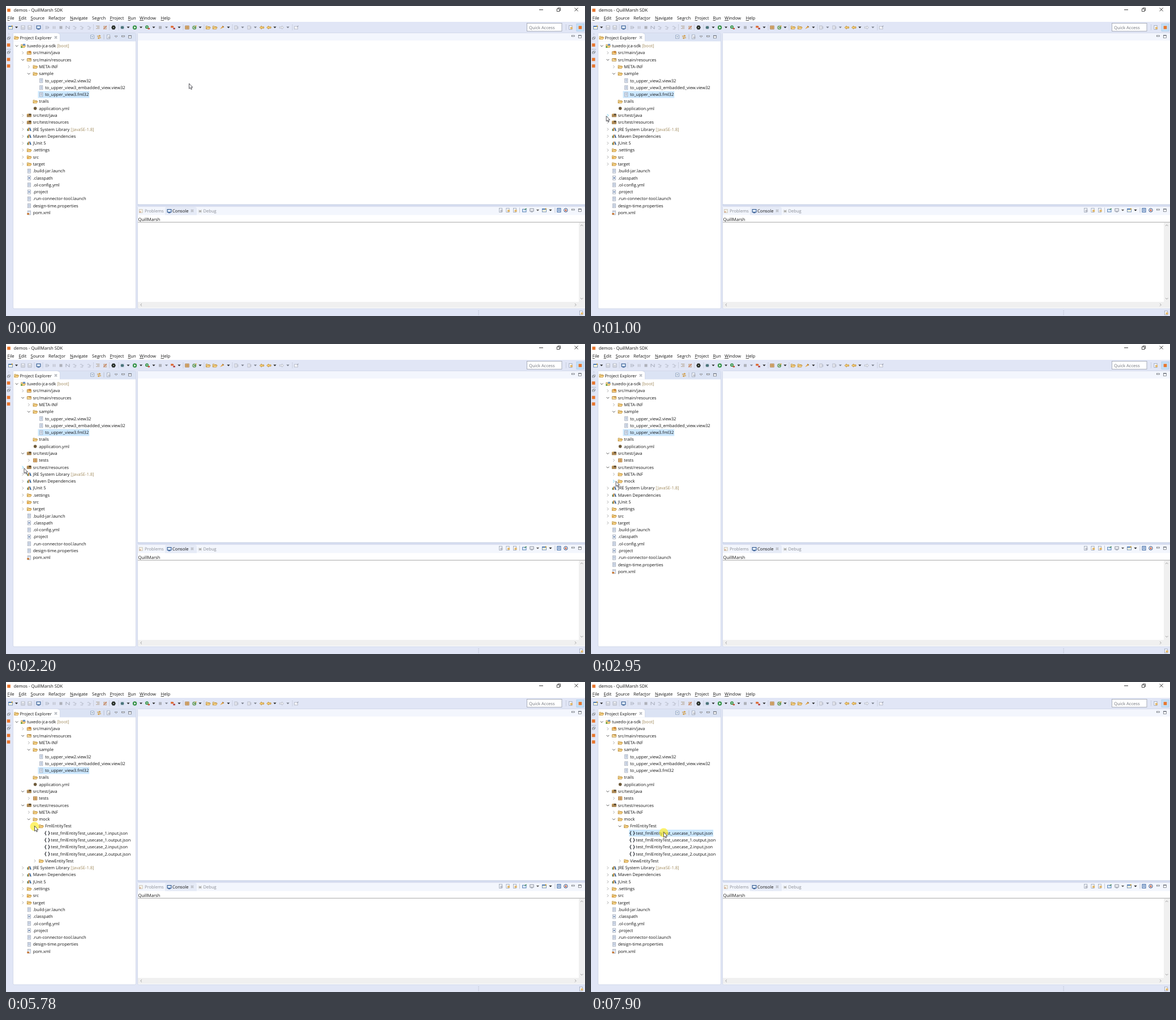
An HTML page for the animation above (8000 ms loop, 1023x548 px).

```html
<!DOCTYPE html>
<html lang="en">
<head>
<meta charset="utf-8">
<title>demos - QuillMarsh SDK</title>
<style>
html, body { margin: 0; width: 100%; height: 100%; overflow: hidden; background: #fff; }
svg { display: block; width: 100%; height: 100%; }
text { font-family: "Open Sans", "Noto Sans", sans-serif; font-size: 7.6px; fill: #151515; white-space: pre; text-rendering: geometricPrecision; }
</style>
</head>
<body>
<svg id="stage" viewBox="0 0 1023 548" preserveAspectRatio="none"></svg>
<script>
const LOOP = 8000;
const stage = document.getElementById('stage');

// Markup helpers
const rect = (x, y, w, h, fill, more = '') => `<rect x="${x}" y="${y}" width="${w}" height="${h}" fill="${fill}" ${more}/>`;
const line = (d, color, w = 1, fill = 'none') => `<path d="${d}" stroke="${color}" stroke-width="${w}" fill="${fill}"/>`;
const dot = (x, y, r, fill, more = '') => `<circle cx="${x}" cy="${y}" r="${r}" fill="${fill}" ${more}/>`;
const shape = (d, fill) => `<path d="${d}" fill="${fill}"/>`;
const label = (x, y, s, more = '') => `<text x="${x}" y="${y}" ${more}>${s}</text>`;
const at = (x, y, s) => `<g transform="translate(${x} ${y})">${s}</g>`;
const drop = (x, y, color = '#222') => shape(`M${x - 2.6} ${y - 1.3}h5.2l-2.6 2.8z`, color);
const dots = (x, y1, y2) => `<path d="M${x} ${y1}V${y2}" stroke="#a9afbf" stroke-width="1" stroke-dasharray="1 1.4"/>`;
const bar = (x, y) => line(`M${x} ${y - 4.5}v9`, '#b4b9c8', .8);
const cross = (x, y, r, color, w = .8) => line(`M${x - r} ${y - r}l${2 * r} ${2 * r}M${x + r} ${y - r}l${-2 * r} ${2 * r}`, color, w);

// Icons are centred on 0,0
const folderShape = line('M-3.6 2.8V-2.4h2.6l.8 1h3v1.2', '#b98a35', .8, '#fbe9b0') + line('M-3.6 2.8L-2 -.4H4.2L2.6 2.8Z', '#b98a35', .8, '#fdd88a');
const page = rect(-2.6, -3.5, 5.2, 7, '#f4f7fc', 'stroke="#8e98ab" stroke-width=".7"');
const packed = c => rect(-3.8, -1.8, 7.4, 4.4, c, 'stroke="#8a6a35" stroke-width=".6"') + rect(-3.4, -3, 3.4, 1.6, '#d7a95c');
const icons = {
  folder: folderShape,
  source: packed('#f7c877') + rect(-.8, -3.2, 4, 3, '#c77c2e'),
  resource: packed('#fbdc98') + rect(-.2, -2.8, 3.6, 2.4, '#b68a45'),
  test: packed('#b38d57') + rect(-.6, -3, 4, 2.8, '#594a35'),
  srcdir: folderShape + dot(-2.4, 1.6, 1.7, '#e5a84c'),
  project: folderShape + rect(-.4, -3.6, 4.2, 3, '#6b94c5') + dot(-2.8, 2, 1.5, '#5da648'),
  library: rect(-3.5, -1, 1.7, 4, '#4d7d58') + rect(-1.7, -2.8, 1.8, 5.8, '#c58437') + shape('M.3 -2.5l1.5 -.5L4 2.8H1.5z', '#3f6796'),
  file: page + line('M-1.5 -1.8h3M-1.5 -.2h3M-1.5 1.4h3', '#7790b7', .7),
  xml: page + cross(0, 0, 1.2, '#33588f', 1),
  pom: page + shape('M-3.8 3.4V.6h4v2.8z', '#c97835') + line('M-1.4 -1.8h2.8', '#7790b7', .7),
  yml: dot(0, 0, 2.8, '#6d5a3a'),
  pack: rect(-3.1, -2.8, 6.2, 5.6, '#f3d5a2', 'stroke="#a76b28" stroke-width=".9"') + line('M0 -2.8v5.6M-3.1 0h6.2', '#a76b28', .9),
  json: line('M-1.7 -3.4q-1.3 0 -1.3 1.4T-4 0q1 .2 1 1.9t1.3 1.5M1.7 -3.4q1.3 0 1.3 1.4T4 0q-1 .2 -1 1.9t-1.3 1.5', '#20242c', 1.1),
  screen: rect(-3.4, -2.9, 6.8, 4.8, '#e7f0fb', 'stroke="#2c568f" stroke-width="1.1"') + line('M-2 3.2h4', '#2c568f', 1),
  grayScreen: rect(-3.2, -2.8, 6.4, 4.6, '#eef0f5', 'stroke="#858b98" stroke-width=".9"') + line('M-2 3h4', '#858b98', .9),
  window: rect(-3.6, -2.6, 7.2, 5.6, '#fff9df', 'stroke="#5b7dad" stroke-width=".8"') + rect(-3.6, -2.8, 7.2, 1.8, '#4d7ab5') + shape('M2 -4l2.4 1.4L2 -.6z', '#d9a52e'),
  floppy: rect(-3.2, -3.2, 6.4, 6.4, '#d3d6df', 'stroke="#aeb3bf" stroke-width=".7"') + rect(-1.6, -3, 3.2, 2, '#f1f2f6'),
  gray: line('M-3 -2h3.4M-3 0h5.6M-3 2h3.4M1 -2.4l2.6 2.4L1 2.4', '#a7acb9', .9),
  pause: line('M-1.5 -2.6v5.2M1.5 -2.6v5.2', '#bcc0cb', 1.6),
  stop: rect(-2.5, -2.5, 5, 5, '#aeb1ba'),
  cut: line('M-3 2.8V-2.6L3 2.6V-2.8', '#999eac', .9),
  step: line('M-3.2 -1.6q3.4 -1.8 4.6 2M-.2 -.4l1.8 1.8l1.4 -2M-2.4 2.8h4.4', '#afb4c1', .9),
  lines: line('M-3 -2.6h6.4M-1 -.4h4.4M-3 1.8h6.4', '#ad9b80', .9),
  tools: line('M-3 -2h6M-3 0h6M-3 2.4h6', '#b98244', .9) + line('M-3 3L3 -3', '#c55339', .9),
  hex: shape('M-3.8 0L-2 -3.5H2L3.8 0L2 3.5H-2z', '#202521') + dot(0, 0, 1.3, '#8b9a8d'),
  bug: dot(0, 0, 2.2, '#62958a', 'stroke="#315a66" stroke-width=".8"') + line('M-3.4 0h6.8M-2.6 -2.8l5.2 5.6M2.6 -2.8l-5.2 5.6', '#3d6572', .7),
  grayBug: dot(0, 0, 1.9, '#bdbdb8') + line('M-3.4 0h6.8M-2.5 -2.8l5 5.6M2.5 -2.8l-5 5.6', '#a5a5a2', .7),
  run: dot(0, 0, 3.7, '#359248') + shape('M-1.1 -2L2.2 0l-3.3 2z', '#fff'),
  cover: dot(-1, -.8, 2.9, '#359248') + shape('M-1.7 -2.2L.8 -.8l-2.5 1.4z', '#fff') + rect(.6, .8, 3.4, 2.4, '#c24f36'),
  external: shape('M-3.8 -3h4l1.6 2l-1.6 1.6h-4z', '#df6e38') + rect(.4, .6, 3.4, 2.6, '#b03838'),
  klass: dot(-.3, .2, 3.4, '#61985b') + line('M1 -1.1a1.7 1.7 0 1 0 0 2.4', '#fff', .9) + rect(1.6, -3.6, 2, 2, '#e2ae48'),
  brush: shape('M-3.8 2.8L.6 -2.8L3.2 -.6z', '#e2a548') + line('M.6 -2.6l2.4 2', '#8e6634', 1.2),
  next: rect(-3, -3, 4.2, 6, '#e5e7ee', 'stroke="#b1b5c0" stroke-width=".8"') + line('M2.8 -2v4.4', '#b1b5c0', 1),
  back: line('M-3.8 0L-.6 -2.8V-1.2H3.6V1.2H-.6V2.8Z', '#b78025', .8, '#fbd77e'),
  forth: line('M3.8 0L.6 -2.8V-1.2H-3.6V1.2H.6V2.8Z', '#b1b5c0', .8, '#eef0f5'),
  pin: rect(-3.4, -2, 6, 4.8, '#f4f5f9', 'stroke="#b1b5c0" stroke-width=".8"') + line('M1 -.6L3.6 -3', '#a0a5b2', 1.1),
  pinOn: rect(-3.4, -1.8, 6.4, 4.8, '#e1edfa', 'stroke="#4776ae" stroke-width=".9"') + line('M.4 -.8L3.6 -3', '#3f8751', 1.4),
  collapse: rect(-2.8, -2.8, 5.6, 5.6, '#fff', 'stroke="#7890b2" stroke-width=".8"') + line('M-1.6 0h3.2', '#37659e', .9),
  link: line('M-3.4 -1.2H2M0 -3l2.4 1.8M3.4 1.6H-2M0 3.4l-2.4 -1.8', '#cf9434', 1.3),
  warn: rect(-3.2, -2.8, 6, 5.6, '#f4f1e8', 'stroke="#bfb8a6" stroke-width=".7"') + rect(-2.8, .4, 2.6, 2, '#d9a68c'),
  docs: page + rect(-.4, -.8, 4, 3.6, '#e2b76a'),
  docsGray: page + rect(-.4, -.8, 4, 3.6, '#b9bcc6'),
  blueDoc: rect(-3, -3.3, 6, 6.6, '#e4eefb', 'stroke="#315f9f" stroke-width="1"') + line('M-1.6 -1.2h3.2M-1.6 .8h3.2', '#315f9f', .9),
  ring: dot(0, 0, 3.2, '#fff', 'stroke="#334f82" stroke-width="1"') + shape('M-1.8 1.6L0 -2.6L1.8 1.6z', '#c65332'),
  brand: rect(-2.8, -2.8, 5.6, 5.6, '#e8762d'),
  restore: rect(-1.2, -2.2, 3.4, 2.6, '#fff', 'stroke="#606774" stroke-width=".7"') + rect(-2.4, -.6, 3.2, 2.6, '#fff', 'stroke="#606774" stroke-width=".7"'),
  mini: rect(-2.6, -2, 5.2, 1.9, '#fff', 'stroke="#5e6470" stroke-width=".7"'),
  maxi: rect(-2.6, -2.3, 5.2, 4.6, '#fff', 'stroke="#5e6470" stroke-width=".7"') + line('M-2.6 -1.7h5.2', '#5e6470', .9)
};
const icon = (name, x, y) => at(x, y, icons[name]);
const iconRow = (y, list) => list.split(' ').map(s => { const [n, x] = s.split(':'); return icon(n, +x, y); }).join('');

function windowFrame() {
  const menus = [['_File', 2.5], ['_Edit', 22.5], ['_Source', 43.5], ['Refac_tor', 75], ['_Navigate', 113], ['Se_arch', 152], ['_Project', 183.5], ['_Run', 215.5], ['_Window', 236], ['_Help', 273.5]];
  const key = s => s.replace(/_(.)/, '<tspan text-decoration="underline">$1</tspan>');
  return rect(0, 0, 1023, 548, '#e1e6f6') + rect(0, 0, 1023, 28, '#fff')
    + icon('brand', 5, 7.5) + label(13.5, 9.8, 'demos - QuillMarsh SDK', 'style="font-size:7.7px"')
    + line('M942 6.7h7', '#222', .9) + line('M973.4 5h4.6v4.6h-4.6zM975 5V3.4h4.6V8H978', '#222', .8) + cross(1007.7, 6.3, 3, '#222', .9)
    + menus.map(([s, x]) => label(x, 24, key(s), 'style="font-size:7.7px"')).join('');
}

function toolbar() {
  return iconRow(38, 'window:8 floppy:30 floppy:42 screen:57.5 gray:72.5 pause:85 stop:97 cut:109 step:121.5 step:134 step:147 lines:162 tools:175 hex:190 bug:205.5 run:227.5 cover:250 stop:272.5 external:295 pack:320 klass:333 folder:357 folder:369 brush:382 next:407 next:430 back:452 back:464.5 forth:487 pin:513')
    + [18.5, 216, 238.5, 261, 306, 343, 393, 475].map(x => drop(x, 37.8)).join('')
    + [283.5, 418, 440.5, 498].map(x => drop(x, 37.8, '#777c88')).join('')
    + [50, 65, 154.5, 182.5, 199, 313, 350, 400, 506, 989.5].map(x => dots(x, 33, 43)).join('')
    + rect(920.5, 30.5, 61.5, 14, '#fff', 'stroke="#9aa0ad" stroke-width=".8"') + label(924, 40.6, 'Quick Access', 'style="fill:#70747c"')
    + icon('docs', 997.5, 38) + rect(1008, 31.5, 13, 13, '#c5dff5', 'stroke="#9cc7ea" stroke-width=".6"') + icon('brand', 1014.5, 38);
}

function panels() {
  const box = (x, y, w, h) => rect(x, y, w, h, '#fff', 'stroke="#ccd3e6" stroke-width=".8" rx="2"');
  const head = (x, y, w, h, color = '#f3f6fd') => rect(x, y, w, h, color);
  const gone = 'style="fill:#8a8e96"';
  const arrow = d => line(d, '#9a9a9a', .9);
  return dots(5, 48, 52) + icon('restore', 5, 57) + icon('brand', 4.5, 69) + line('M1 76.5h8', '#a9afbf', .8) + icon('restore', 5, 82) + icon('brand', 4.5, 94.5) + icon('brand', 4.5, 106)
    + box(12.5, 47.5, 217, 487.5) + head(13, 48, 216, 14.5, '#dbe3f4') + shape('M13 62.5V49q0 -1 1 -1H91q4 0 4.5 4V62.5z', '#fff') + line('M91 47.8q4.5 0 4.5 4.5V62', '#ccd3e6', .8)
    + icon('folder', 18.5, 56) + label(24.5, 58.6, 'Project Explorer') + cross(88, 55.5, 2, '#858a95', 1.3) + cross(88, 55.5, 1.8, '#fff', .6)
    + iconRow(54.5, 'collapse:152.5 link:164.5 docsGray:181 mini:207 maxi:219') + bar(173, 54.5)
    + line('M192 53h5l-2.5 2.5z', '#5e6470', .7, '#fff')
    + box(232.5, 47.5, 794, 303.5) + head(233, 48, 790, 13) + iconRow(54, 'mini:1002 maxi:1014') + line('M232 351.8H1023', '#c3cee6', 1.2)
    + box(232.5, 354.5, 794, 180.5) + head(233, 355, 790, 14.5)
    + shape('M281 369.5V358q0 -3 3 -3H333q4 0 4 4V369.5z', '#e6ebf7')
    + icon('warn', 238.5, 362.5) + label(245, 365.4, 'Problems', gone) + icon('screen', 288.5, 362.5) + label(294, 365.4, 'Console')
    + cross(329, 362, 2, '#858a95', 1.3) + cross(329, 362, 1.8, '#fff', .6) + icon('grayBug', 343, 362.8) + label(348.5, 365.4, 'Debug', gone)
    + iconRow(361, 'docsGray:874 docs:886.5 docs:899 pinOn:916 grayScreen:929 window:951 blueDoc:977 ring:989 mini:1002 maxi:1014')
    + bar(907.5, 361) + bar(970, 361) + drop(939.5, 361, '#555') + drop(962, 361)
    + label(233.5, 379.6, 'QuillMarsh') + line('M233 382.2H1023', '#9c9c9c', .9)
    + rect(1012, 383, 10.5, 140, '#f0f0f0') + rect(233, 523, 789.5, 10.5, '#f0f0f0')
    + arrow('M1015 389l2.3 -2.3l2.3 2.3') + arrow('M1015 516l2.3 2.3l2.3 -2.3') + arrow('M240 526l-2.3 2.3l2.3 2.3') + arrow('M1005 526l2.3 2.3l-2.3 2.3')
    + dots(835, 538, 547) + icon('docs', 1016, 542.5);
}

// Tree rows: depth, icon, name, time shown from, time opened (0 = open from start, -1 = leaf, LOOP = never)
const OPEN1 = 1320, OPEN2 = 2280, OPEN3 = 3090, OPEN4 = 5780, PICK = 7900;
const never = LOOP;
const json = s => [4, 'json', `test_fmlEntityTest_usecase_${s}.json`, OPEN4, -1];
const rows = [
  [0, 'project', 'tuxedo-jca-sdk|[boot]', 0, 0],
  [1, 'source', 'src/main/java', 0, never],
  [1, 'resource', 'src/main/resources', 0, 0],
  [2, 'folder', 'META-INF', 0, never],
  [2, 'folder', 'sample', 0, 0],
  [3, 'file', 'to_upper_view2.view32', 0, -1],
  [3, 'file', 'to_upper_view3_embadded_view.view32', 0, -1],
  [3, 'file', 'to_upper_view3.fml32', 0, -1],
  [2, 'folder', 'trails', 0, -1],
  [2, 'yml', 'application.yml', 0, -1],
  [1, 'test', 'src/test/java', 0, OPEN1],
  [2, 'pack', 'tests', OPEN1, never],
  [1, 'test', 'src/test/resources', 0, OPEN2],
  [2, 'folder', 'META-INF', OPEN2, never],
  [2, 'folder', 'mock', OPEN2, OPEN3],
  [3, 'folder', 'FmlEntityTest', OPEN3, OPEN4],
  ...['1.input', '1.output', '2.input', '2.output'].map(json),
  [3, 'folder', 'ViewEntityTest', OPEN3, never],
  [1, 'library', 'JRE System Library|[JavaSE-1.8]', 0, never],
  [1, 'library', 'Maven Dependencies', 0, never],
  [1, 'library', 'JUnit 5', 0, never],
  [1, 'folder', '.settings', 0, never],
  [1, 'srcdir', 'src', 0, never],
  [1, 'folder', 'target', 0, never],
  ...['file:.build-jar.launch', 'xml:.classpath', 'file:.ol-config.yml', 'xml:.project', 'file:.run-connector-tool.launch', 'file:design-time.properties', 'pom:pom.xml']
    .map(s => [1, ...s.split(':'), 0, -1])
].map(([depth, kind, name, from, open]) => ({ depth, kind, name, from, open }));

function rowMarkup({ depth, kind, name }) {
  const x = 19 + depth * 10.65;
  const [main, note] = name.split('|');
  const size = kind === 'json' ? 7.4 : 7.55;
  const tail = note ? ` <tspan fill="#a08a5c">${note}</tspan>` : '';
  return `<g><rect x="${x + 5.5}" y="-6.1" height="12.2"/>`
    + `<path fill="none" stroke-width=".9"/>` + icon(kind, x + 11.3, 0)
    + label(x + 18, 2.6, main + tail, `style="font-size:${size}px"`) + '</g>';
}

stage.innerHTML = windowFrame() + toolbar() + panels() + '<g id="tree">' + rows.map(rowMarkup).join('') + '</g>'
  + dot(0, .8, 8, '#fdec2a', 'id="glow" opacity=".68"')
  + '<path id="cursor" d="M0 0V9.2L2.1 7.3L3.5 10.5L5 9.8L3.6 6.8H6.4Z" fill="#fff" stroke="#2b2b33" stroke-width=".8" stroke-linejoin="round"/>';

const glow = document.getElementById('glow'), cursor = document.getElementById('cursor');
[...document.getElementById('tree').children].forEach((g, i) => {
  const [back, chevron] = g.children;
  const width = g.lastChild.getComputedTextLength() + 13.5;
  back.setAttribute('width', width);
  Object.assign(rows[i], { g, back, chevron, width, x: 19 + rows[i].depth * 10.65 });
});

// Pointer moves: start, end, steps, x, y
const moves = [
  [200, 1000, 10, 27, 194.5], [1080, 1240, 3, 29, 194], [1640, 2200, 8, 32, 219.5],
  [2430, 2950, 7, 44, 242.5], [3230, 3860, 8, 50.5, 254.5],
  [6670, 7030, 5, 116, 281], [7120, 7430, 4, 131, 266], [7510, 7750, 4, 128.5, 265.5]
];
const clicks = [OPEN1, OPEN2, OPEN3, OPEN4, PICK];
const ease = p => p * p * (3 - 2 * p);

function pointer(t) {
  let x = 323.5, y = 137;
  for (const [start, end, steps, toX, toY] of moves) {
    if (t < start) break;
    const step = Math.min(steps, 1 + Math.floor((t - start) / (end - start) * (steps - 1) + 1e-6));
    const p = ease(step / steps);
    x += (toX - x) * p;
    y += (toY - y) * p;
  }
  return [x, y];
}

function draw(t) {
  const [px, py] = pointer(t);
  const picked = t < PICK ? 'to_upper_view3.fml32' : 'test_fmlEntityTest_usecase_1.input.json';
  let n = 0;
  for (const r of rows) {
    const shown = t >= r.from;
    r.g.style.display = shown ? '' : 'none';
    if (!shown) continue;
    const y = 70.5 + 12.29 * n++;
    r.g.setAttribute('transform', `translate(0 ${y.toFixed(2)})`);
    const inRow = Math.abs(py - y) < 6.1;
    const over = inRow && px > r.x + 5.5 && px < r.x + 5.5 + r.width;
    r.back.setAttribute('fill', r.name === picked ? '#cce8ff' : over ? '#e5f3ff' : 'none');
    if (r.open < 0) continue;
    const open = t >= r.open;
    r.chevron.setAttribute('d', open ? `M${r.x - 2.3} -1.1l2.3 2.3l2.3 -2.3` : `M${r.x - 1.1} -2.3l2.3 2.3l-2.3 2.3`);
    r.chevron.setAttribute('stroke', inRow && Math.abs(px - r.x) < 5 ? '#4cc2ee' : open ? '#404040' : '#a0a0a0');
  }
  const place = `translate(${px.toFixed(2)} ${py.toFixed(2)})`;
  cursor.setAttribute('transform', place);
  glow.setAttribute('transform', place);
  glow.style.display = clicks.some(c => t >= c && t < c + 140) ? '' : 'none';
}

const begin = performance.now();
function tick() {
  draw((performance.now() - begin) % LOOP);
  requestAnimationFrame(tick);
}
draw(0);
requestAnimationFrame(tick);
</script>
</body>
</html>
```
